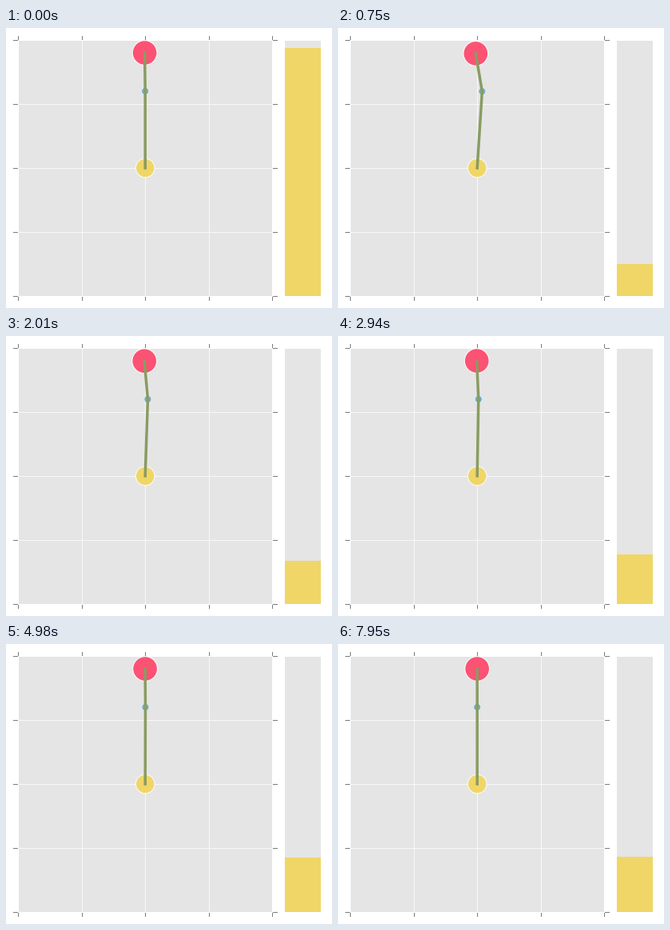
Recreate the animation shown at these times as a matplotlib script. Size 408 by 350 pixels, loop 8000 ms.

```python
import math

import matplotlib.pyplot as plt
from matplotlib.animation import FuncAnimation
from matplotlib.patches import Circle, Rectangle

W, H, DPI = 408, 350, 100
PX = 72 / DPI                     # one pixel in points
LOOP, STEP = 8000, 20

PANEL, TICK = "#e5e5e5", "#7c7c7c"
RED, YELLOW, BLUE, ROD = "#fc5274", "#f0d666", "#6bb3cb", "#8a9c62"

PIVOT = (174.2, 175.0)
LOWER, UPPER = 96, 48             # rod lengths
FLOOR = 335

fig = plt.figure(figsize=(W / DPI, H / DPI), dpi=DPI, facecolor="white")
ax = fig.add_axes([0, 0, 1, 1])
ax.set_xlim(0, W)
ax.set_ylim(H, 0)
ax.axis("off")


def box(x, y, w, h, color, z):
    return ax.add_patch(Rectangle((x, y), w, h, fc=color, lw=0, zorder=z))


def rule(x0, y0, x1, y1, color, z=2):
    ax.plot([x0, x1], [y0, y1], color=color, lw=PX, zorder=z,
            solid_capstyle="butt", snap=False)


def ball(r, color, z, edge=1.2):
    return ax.add_patch(Circle(PIVOT, r, fc=color, ec="#f8f8f8",
                               lw=edge * PX, zorder=z))


box(16, 16, 317, 319, PANEL, 1)
box(349, 16, 45, 319, PANEL, 1)

for k, x in enumerate((15.5, 95.5, 174.5, 254.5, 333.5)):
    if 0 < k < 4:
        rule(x, 16, x, 335, "#f8f8f8")
    rule(x, 10, x, 15, TICK)
    rule(x, 336, x, 341, TICK)

for k in range(5):
    y = 15.5 + 80 * k
    if 0 < k < 4:
        rule(16, y, 333, y, "#f8f8f8")
    rule(9, y, 15, y, TICK)
    rule(334, y, 340, y, TICK)

bar = box(349, 26, 45, 309, YELLOW, 3)
base = ball(11.8, YELLOW, 4)
joint = ball(4.5, BLUE, 4, 0.6)
head = ball(15.4, RED, 4)
rod, = ax.plot([], [], color=ROD, lw=3.5 * PX, zorder=5,
               solid_capstyle="projecting", solid_joinstyle="round")


def state(t):
    """Joint offset, head offset and bar height at time t in ms."""
    drift = (22.7 + 0.0605 * t) * math.exp(-t / 900)
    q = t / 45
    kick = math.exp(-q)
    lean = 0.208 * drift * (1 - (1 + q) * kick)
    tip = -0.3 * lean - 0.6 * kick
    level = 69.4 - drift + 263 * (1 - q) * kick
    return lean, tip, max(level, 0)


def draw(i):
    lean, tip, level = state(i * STEP)
    x, y = PIVOT
    jx, jy = x + lean, y - math.sqrt(LOWER ** 2 - lean ** 2)
    hx, hy = x + tip, jy - math.sqrt(UPPER ** 2 - (tip - lean) ** 2)
    joint.center = jx, jy
    head.center = hx, hy
    rod.set_data([x, jx, hx], [y, jy, hy])
    bar.set_y(FLOOR - level)
    bar.set_height(level)
    return bar, joint, head, rod


anim = FuncAnimation(fig, draw, frames=LOOP // STEP, interval=STEP,
                     repeat=True, repeat_delay=0)
plt.show()
```
